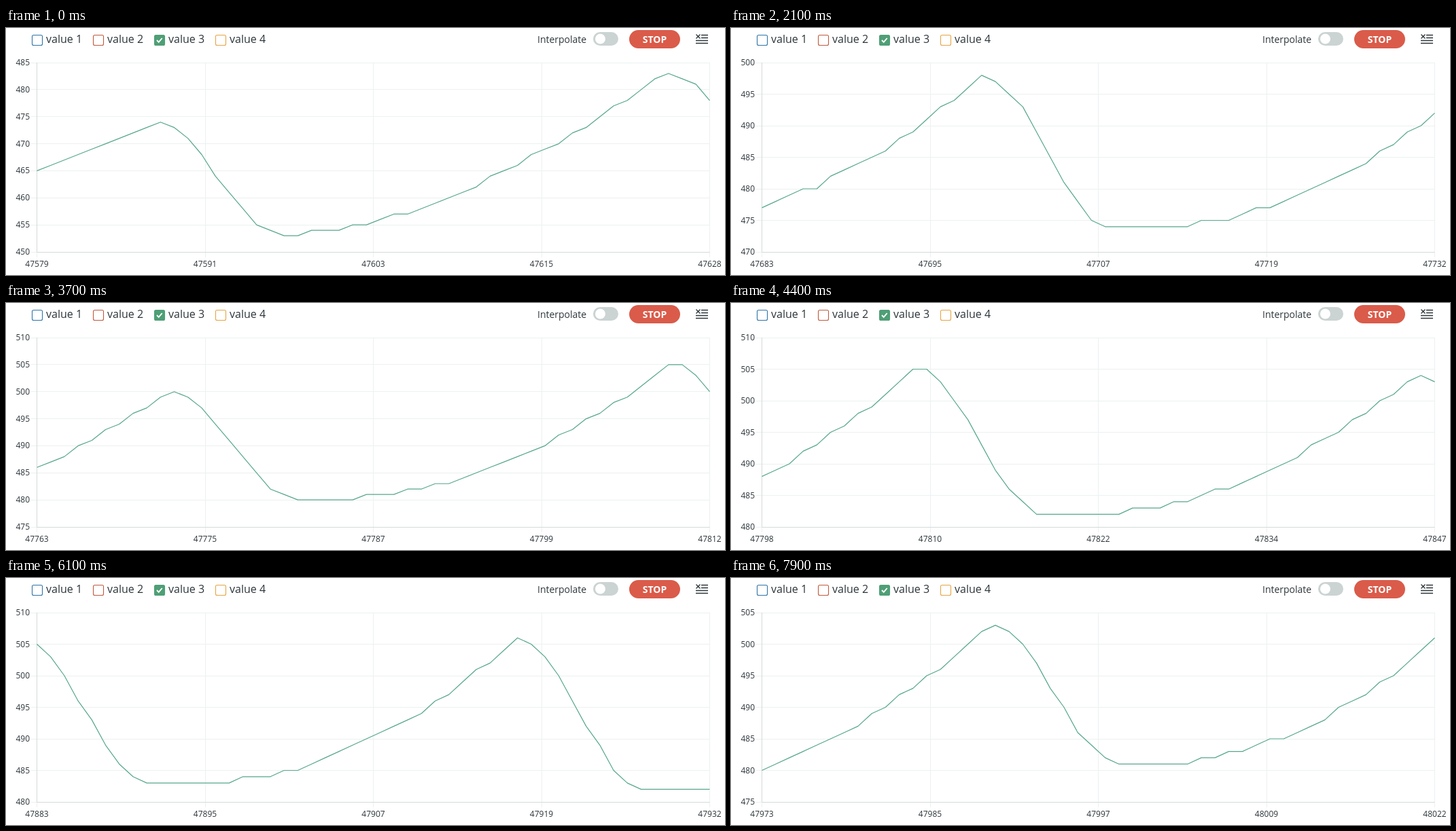
Write an HTML page that moves like this. It is 1058 by 364 pixels and loops after 8 s.

```html
<!DOCTYPE html>
<html lang="en">
<head>
<meta charset="utf-8">
<title>Live plot</title>
<style>
  html, body { margin: 0; width: 100%; height: 100%; overflow: hidden; background: #fff; }
  svg { display: block; font: 12px "Open Sans", sans-serif; fill: #2c353a; }
  .big { font-size: 16px; }
  .mid { font-size: 14px; }
  .grid { stroke: #ecf1f1; fill: none; }
  .axis { stroke: #d5d9d9; fill: none; }
  .line { stroke: #55a78a; stroke-width: 1.2; fill: none; stroke-linejoin: round; }
</style>
</head>
<body>
<svg width="1058" height="364" viewBox="0 0 1058 364">
  <g id="legend" class="big"></g>
  <text class="mid" x="782" y="22">Interpolate</text>
  <rect x="864" y="6" width="37" height="20" rx="10" fill="#cbd3d3"/>
  <circle cx="874.5" cy="16" r="7.5" fill="#fff"/>
  <rect x="917" y="3" width="75" height="27" rx="13.5" fill="#da5b4a"/>
  <text class="mid" x="954.5" y="22" text-anchor="middle" font-weight="700" fill="#fff">STOP</text>
  <path d="M1015.5 9.5l6 6m0-6l-6 6M1023 10.5h10M1023 14.5h10M1015 18.5h18M1015 22.5h18" stroke="#2c353a" stroke-width="1.3" fill="none"/>
  <g id="plot"></g>
</svg>
<script>
const STEP_MS = 100, STEPS = 80, FIRST = 47579, SPAN = 49;
const LEFT = 45, RIGHT = 1035.5, TOP = 51, BOTTOM = 330;

// Each wave falls from its crest to its floor, rests, then climbs to the next crest
const crests = [470, 474, 483, 495, 498, 499, 500, 505, 504, 506, 506, 504, 503, 507];
const floors = [464, 453, 464, 474, 474, 474, 480, 482, 482, 483, 482, 477, 481, 482];
const FALL = 9.5, REST_END = 12;

// Reading at which a wave starts; the waves shorten slightly
const waveStart = n => -28.98 + 37.554 * n - 0.077 * n * n;
const lerp = (a, b, t) => a + (b - a) * t;

function reading(i) {
  let n = 0;
  while (waveStart(n + 1) <= i) n++;
  const age = i - waveStart(n), length = waveStart(n + 1) - waveStart(n);
  if (age < FALL) {
    return Math.round(lerp(floors[n], crests[n], (1 + Math.cos(Math.PI * age / FALL)) / 2));
  }
  const floor = lerp(floors[n], floors[n + 1], (age - FALL) / length);
  const climb = Math.max(0, (age - REST_END) / (length - REST_END));
  return Math.round(lerp(floor, crests[n + 1], climb ** 2));
}

// About five readings arrive per step
function firstReading(step) {
  return step < 12 ? Math.round(step * 53 / 11) : step * 5 - 1;
}

const crisp = v => Math.floor(v) + 0.5;
const label = (x, y, anchor, text) => `<text x="${x}" y="${y}" text-anchor="${anchor}">${text}</text>`;
const path = (name, d) => `<path class="${name}" d="${d}"/>`;

function drawPlot(step) {
  const start = firstReading(step);
  const values = Array.from({ length: SPAN + 1 }, (_, i) => reading(start + i));
  const low = Math.floor((Math.min(...values) - 1) / 5) * 5;
  const high = Math.ceil((Math.max(...values) + 1) / 5) * 5;
  const xAt = i => LEFT + 0.5 + i / SPAN * (RIGHT - LEFT - 0.5);
  const yAt = v => BOTTOM - (v - low) / (high - low) * (BOTTOM - TOP);

  let grid = "", labels = "";
  for (let v = low; v <= high; v += 5) {
    grid += `M${LEFT - 8} ${crisp(yAt(v))}H${RIGHT}`;
    labels += label(35, yAt(v) + 4, "end", v);
  }
  for (let i = 0; i <= SPAN; i += SPAN / 4) {
    grid += `M${crisp(xAt(i))} ${TOP}V${BOTTOM + 8}`;
    labels += label(xAt(i), 352, "middle", FIRST + start + Math.floor(i));
  }
  const trace = "M" + values.map((v, i) => `${xAt(i).toFixed(2)} ${yAt(v).toFixed(2)}`).join("L");
  plot.innerHTML = path("grid", grid) + path("axis", `M45.5 ${TOP}V330.5H${RIGHT}`) +
    path("line", trace) + labels;
}

const plot = document.getElementById("plot");
document.getElementById("legend").innerHTML = ["#2f73a6", "#c05a3c", "#4f9f76", "#e5a444"].map((color, i) => {
  const x = 38 + 90 * i, on = i === 2;
  return `<rect x="${x + 0.5}" y="10.5" width="15" height="15" rx="2" stroke="${color}" stroke-width="1.1" fill="${on ? color : "#fff"}"/>` +
    (on ? `<path d="M${x + 4} 18l2.7 2.8 5-5.8" stroke="#fff" stroke-width="1.9" fill="none"/>` : "") +
    label(x + 21, 22, "start", `value ${i + 1}`);
}).join("");

let shown = -1;
function tick() {
  const step = Math.floor(performance.now() / STEP_MS) % STEPS;
  if (step !== shown) drawPlot(shown = step);
  requestAnimationFrame(tick);
}
tick();
</script>
</body>
</html>
```
